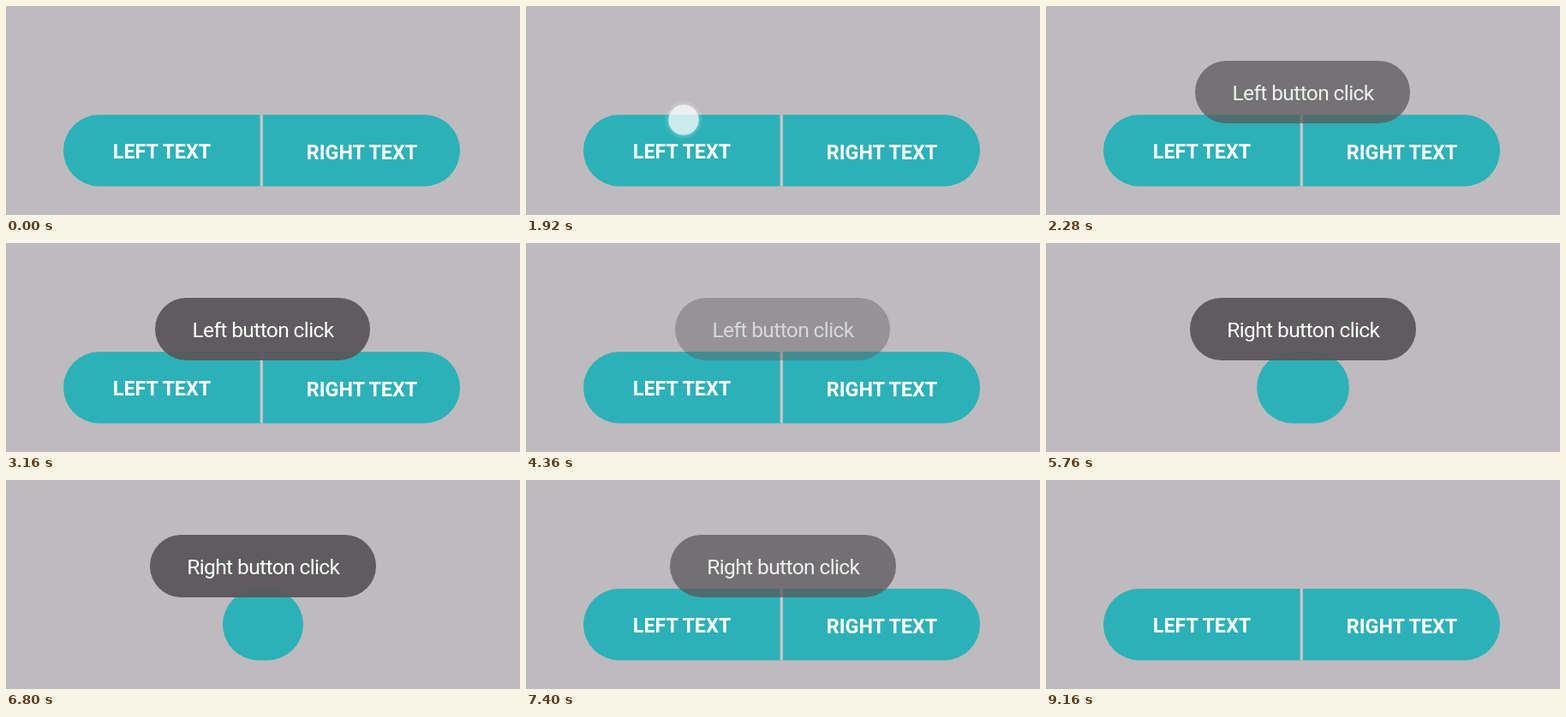
Recreate the animation shown at these times as an HTML page. Size 600 by 244 pixels, loop 9200 ms.

```html
<!DOCTYPE html>
<html lang="en">
<head>
<meta charset="utf-8">
<title>Twin button</title>
<style>
  html, body { margin: 0; width: 100%; height: 100%; overflow: hidden; background: #bdbbbe; }
  svg { display: block; width: 100vw; height: 100vh; }
  text { fill: #fff; text-anchor: middle; font-family: Roboto, sans-serif; }
  #labels text { font-size: 23.3px; font-weight: 700; }
  .toast rect { fill: #5a585a; fill-opacity: .95; }
  .toast text { font-size: 24.5px; letter-spacing: -.6px; }
</style>
</head>
<body>
<svg viewBox="0 0 600 244">
  <defs>
    <radialGradient id="glow">
      <stop offset=".74" stop-color="#fff" stop-opacity=".75"/>
      <stop offset=".8" stop-color="#fff" stop-opacity=".18"/>
      <stop offset="1" stop-color="#fff" stop-opacity="0"/>
    </radialGradient>
  </defs>
  <rect id="pill" y="127" height="83.5" rx="41.75" fill="#2db1b8"/>
  <g id="labels">
    <rect x="296.6" y="127" width="3.3" height="83.5" fill="#c8c6c9"/>
    <text x="182" y="177.8">LEFT TEXT</text>
    <text x="415.5" y="178.6">RIGHT TEXT</text>
  </g>
  <g class="toast" id="leftToast">
    <rect x="174" y="64" width="251" height="73" rx="36.5"/>
    <text x="300" y="110">Left button click</text>
  </g>
  <g class="toast" id="rightToast">
    <rect x="168" y="64" width="264" height="73" rx="36.5"/>
    <text x="300.3" y="110">Right button click</text>
  </g>
  <circle id="dot" r="23" fill="url(#glow)"/>
</svg>
<script>
const LOOP = 9200;
const FULL = 466, ROUND = 83.5;
const SHRINK = 5250, GROW = 6748, DONE = 7248;
const taps = [
  { down: 1920, up: 2020, x: 184, y: 133 },
  { down: 5080, up: 5215, x: 399, y: 176 }
];
const $ = id => document.getElementById(id);
const progress = (t, start, length) => Math.min(1, Math.max(0, (t - start) / length));
const smooth = p => (1 - Math.cos(Math.PI * p)) / 2;

// Decelerating fade in, accelerating fade out
function toastAlpha(t, start) {
  const enter = 1 - (1 - progress(t, start, 500)) ** 2;
  const leave = progress(t, start + 1961, 500) ** 2;
  return enter * (1 - leave);
}

function drawPill(t) {
  const morphing = t >= SHRINK && t < DONE;
  const closed = smooth(progress(t, SHRINK, 610)) - smooth(progress(t, GROW, DONE - GROW));
  const width = morphing ? FULL + (ROUND - FULL) * closed : 463;
  const center = morphing ? 300 : 298.5;
  $("pill").setAttribute("x", center - width / 2);
  $("pill").setAttribute("width", width);
  $("labels").style.opacity = morphing ? 0 : 1;
}

function drawDot(t) {
  const tap = taps.find(p => t >= p.down && t < p.up + 220);
  $("dot").style.opacity = tap ? 1 - progress(t, tap.up, 205) : 0;
  if (!tap) return;
  $("dot").setAttribute("cx", tap.x);
  $("dot").setAttribute("cy", tap.y);
}

function draw(t) {
  drawPill(t);
  drawDot(t);
  $("leftToast").style.opacity = toastAlpha(t, taps[0].up);
  $("rightToast").style.opacity = toastAlpha(t, taps[1].up);
}

const begin = performance.now();
function tick() {
  draw((performance.now() - begin) % LOOP);
  requestAnimationFrame(tick);
}
tick();
</script>
</body>
</html>
```
